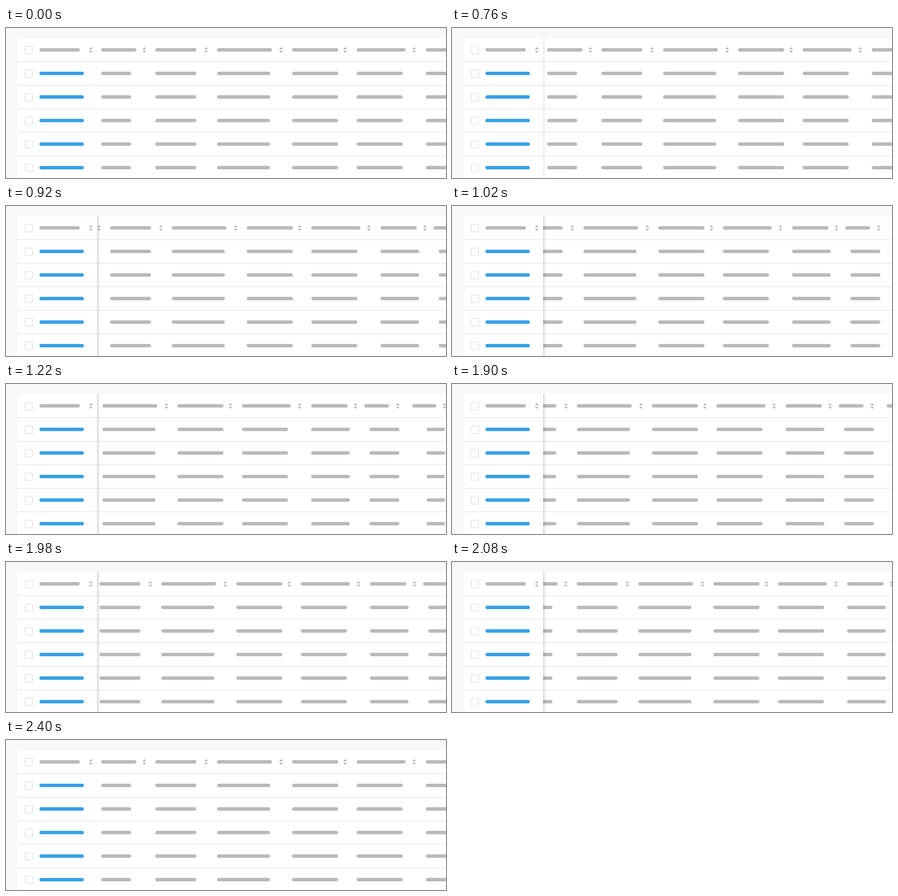
These frames come from a looping animation (763 by 261 pixels, 2980 ms). An HTML page with a canvas:

```html
<!DOCTYPE html>
<html lang="en">
<head>
<meta charset="utf-8">
<title>Table with a sticky column</title>
<style>
  html, body { margin: 0; width: 100%; height: 100%; overflow: hidden; background: #f8f8f7; }
  canvas { display: block; }
</style>
</head>
<body>
<canvas id="stage" width="763" height="261"></canvas>
<script>
const ctx = document.getElementById('stage').getContext('2d');
const WIDTH = 763, HEIGHT = 261;
const LEFT = 20, TOP = 18, PINNED_RIGHT = 158;
const ROW_STEP = 41, ROWS = 6, FIRST_ROW = 38;
const LOOP = 2980, SCROLL = 199, DURATION = 441;
const FORWARD = 791, BACK = 1814, SHADOW_ON = 760;
const GREY = '#bababa', BLUE = '#38a1e5';

// [x, header width, sort icon x, cell x, cell width]
const pinned = [58, 70, 147, 58, 77];
const columns = [
  [165, 61, 240, 165, 52],
  [259, 71, 347, 259, 71],
  [366, 95, 477, 366, 92],
  [496, 80, 588, 496, 80],
  [608, 85, 708, 608, 80],
  [728, 63, 805, 728, 67],
  [820, 43, 878, 829, 52],
  [903, 42, 959, 928, 32]
];

// Cubic Bézier (0.1, 0, 0.55, 1), solved by bisection
function ease(x) {
  if (x <= 0) return 0;
  if (x >= 1) return 1;
  let low = 0, high = 1;
  for (let i = 0; i < 24; i++) {
    const s = (low + high) / 2, r = 1 - s;
    if (0.3 * s * r * r + 1.65 * s * s * r + s * s * s < x) low = s;
    else high = s;
  }
  return low * low * (3 - 2 * low);
}

function bar(x, y, width, color) {
  ctx.fillStyle = color;
  ctx.beginPath();
  ctx.roundRect(x, y - 3, width, 6, 3);
  ctx.fill();
}

function triangle(x, base, tip) {
  ctx.beginPath();
  ctx.moveTo(x - 3.2, base);
  ctx.lineTo(x + 3.2, base);
  ctx.lineTo(x, tip);
  ctx.fill();
}

function column([x, headWidth, sortX, cellX, cellWidth], color) {
  bar(x, FIRST_ROW, headWidth, GREY);
  triangle(sortX, 37, 33);
  triangle(sortX, 39.5, 43.5);
  for (let row = 1; row < ROWS; row++) {
    bar(cellX, FIRST_ROW + row * ROW_STEP, cellWidth, color);
  }
}

function panel(x, right) {
  ctx.fillStyle = '#fff';
  ctx.fillRect(x, TOP, right - x, HEIGHT - TOP);
  ctx.fillStyle = '#e2e2e2';
  for (let row = 0; row < ROWS - 1; row++) {
    ctx.fillRect(x, 58 + row * ROW_STEP, right - x, 1);
  }
}

function checkboxes() {
  ctx.strokeStyle = '#e6e8ee';
  ctx.lineWidth = 1.6;
  for (let row = 0; row < ROWS; row++) {
    ctx.beginPath();
    ctx.roundRect(33, 32 + row * ROW_STEP, 13, 13, 1.5);
    ctx.stroke();
  }
}

function shadow(strength) {
  const fade = ctx.createLinearGradient(PINNED_RIGHT, 0, PINNED_RIGHT + 5, 0);
  fade.addColorStop(0, `rgba(0,0,0,${0.16 * strength})`);
  fade.addColorStop(1, 'rgba(0,0,0,0)');
  ctx.fillStyle = fade;
  ctx.fillRect(PINNED_RIGHT, TOP, 5, HEIGHT - TOP);
}

function draw(time) {
  const offset = SCROLL * (ease((time - FORWARD) / DURATION) - ease((time - BACK) / DURATION));
  ctx.fillStyle = '#f8f8f7';
  ctx.fillRect(0, 0, WIDTH, HEIGHT);
  panel(LEFT, WIDTH);

  ctx.save();
  ctx.translate(-offset, 0);
  columns.forEach(c => column(c, GREY));
  ctx.restore();

  if (time >= SHADOW_ON && time < BACK + DURATION) {
    shadow(0.5 + 0.5 * Math.min(1, offset / 40));
  }
  panel(LEFT, PINNED_RIGHT);
  ctx.fillStyle = '#f8f8f7';
  ctx.fillRect(0, 0, LEFT, HEIGHT);
  checkboxes();
  column(pinned, BLUE);
}

const start = performance.now();
function frame() {
  draw((performance.now() - start) % LOOP);
  requestAnimationFrame(frame);
}
frame();
</script>
</body>
</html>
```
